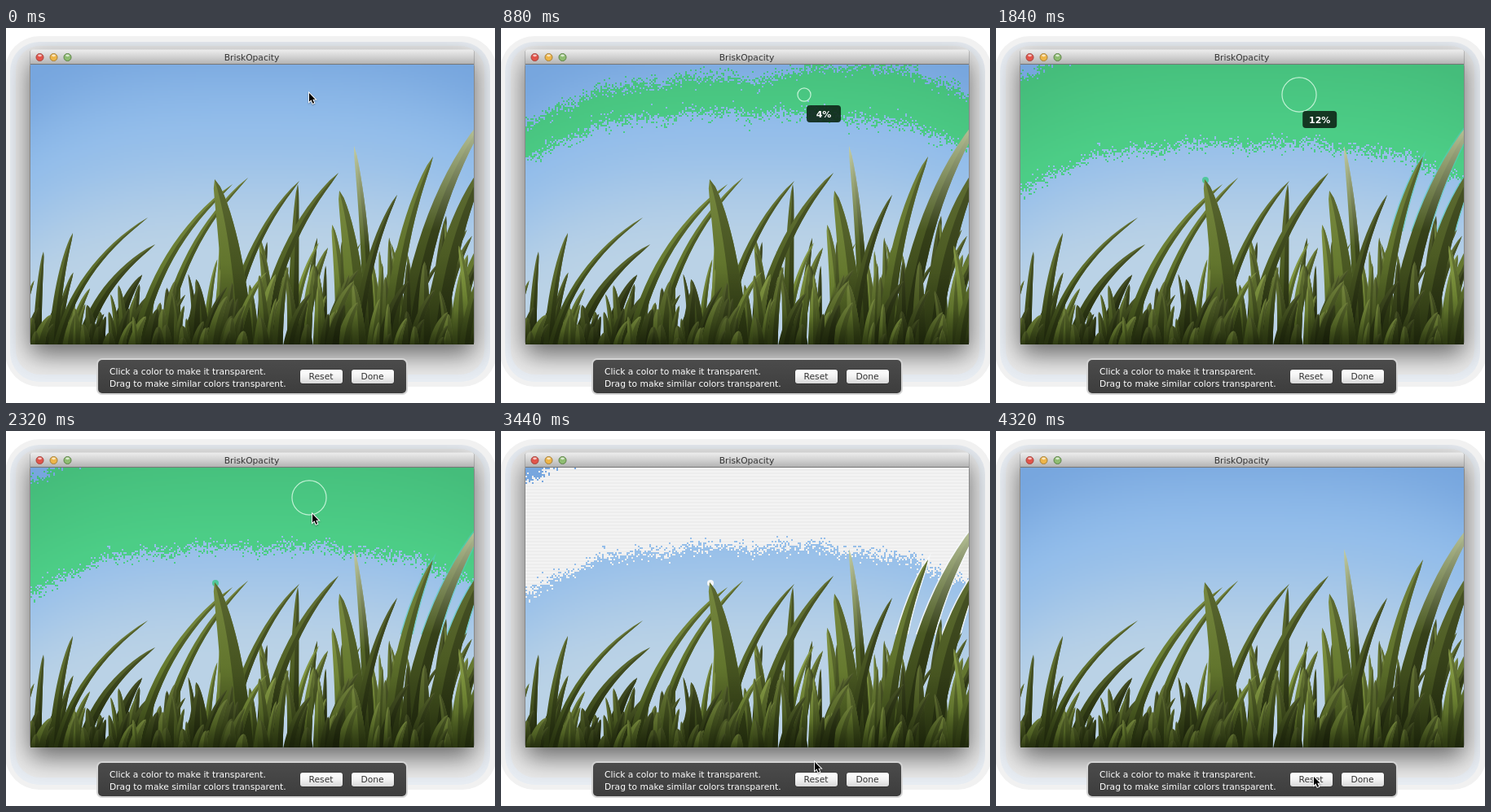
An HTML page with a canvas that plays this animation: 600x461 px, repeating every 4.4 s.

```html
<!DOCTYPE html>
<html lang="en">
<head>
<meta charset="utf-8">
<title>Make a color transparent</title>
<style>
html, body { margin: 0; width: 100%; height: 100%; overflow: hidden; background: #fff; }
canvas { display: block; }
</style>
</head>
<body>
<canvas id="stage" width="600" height="461"></canvas>
<script>
const LOOP = 4400, STEP = 80;
const PRESS = 560, RELEASE = 2320, CLEAR = 2400, RESET = 4080;
const BOX = { x: 30, y: 45, w: 544, h: 344 };
const CELL = 2, COLS = BOX.w / CELL, ROWS = BOX.h / CELL;
const FONT = '"DejaVu Sans", sans-serif';
const ctx = document.getElementById('stage').getContext('2d');

function makeLayer(w, h) {
  const c = document.createElement('canvas');
  c.width = w;
  c.height = h;
  return c.getContext('2d');
}

function seeded(seed) {
  return () => {
    seed = (seed + 0x6D2B79F5) | 0;
    let n = Math.imul(seed ^ (seed >>> 15), 1 | seed);
    n = (n + Math.imul(n ^ (n >>> 7), 61 | n)) ^ n;
    return ((n ^ (n >>> 14)) >>> 0) / 4294967296;
  };
}

const clamp = (v, a, b) => Math.min(b, Math.max(a, v));
const smooth = u => { u = clamp(u, 0, 1); return u * u * (3 - 2 * u); };
const mix = (a, b, u) => a + (b - a) * u;
const mixColor = (a, b, u) => a.map((n, i) => mix(n, b[i], u));

function roundRect(c, x, y, w, h, r, fill) {
  c.beginPath();
  c.roundRect(x, y, w, h, r);
  c.fillStyle = fill;
  c.fill();
}

function vertical(c, y0, y1, ...colors) {
  const g = c.createLinearGradient(0, y0, 0, y1);
  colors.forEach((col, i) => g.addColorStop(i / (colors.length - 1), col));
  return g;
}

function label(c, text, x, y, color, align = 'center', font = '10.7px ') {
  c.font = font + FONT;
  c.textAlign = align;
  c.textBaseline = 'alphabetic';
  c.fillStyle = color;
  c.fillText(text, x, y);
}

// ---- Sky ----
// Lines of equal brightness bow upwards in the middle.
const arc = x => 107 + (x < 300 ? 58 : 43) * Math.abs((x - 300) / 272) ** 3;

function paintCells(color) {
  const layer = makeLayer(COLS, ROWS);
  const img = layer.createImageData(COLS, ROWS);
  for (let i = 0; i < COLS * ROWS; i++) {
    const x = BOX.x + i % COLS * CELL, y = BOX.y + Math.floor(i / COLS) * CELL;
    const rgb = color(x, y, y - arc(x), i);
    if (rgb) img.data.set([...rgb, 255], i * 4);
  }
  layer.putImageData(img, 0, 0);
  return layer.canvas;
}

function skyColor(x, y, d) {
  const top = mixColor([119, 166, 222], [145, 188, 234], smooth((d + 110) / 130));
  return mixColor(top, [186, 210, 230], smooth((d + 15) / 190));
}

const rnd = seeded(7);
const grain = Float32Array.from({ length: COLS * ROWS }, () => (rnd() + rnd() + rnd() - 1.5) * 13);
const masks = {};

// The selected band widens around the clicked color with the tolerance in percent.
function mask(pct, clear) {
  const key = pct + (clear ? 'c' : 'g');
  const lo = -18 - 7 * pct, hi = 0.3 * pct * pct - 8;
  const extra = 24 * Math.min(1, pct / 4);
  return masks[key] ||= paintCells((x, y, d, i) => {
    const v = d + grain[i] + 2.5 * Math.sin(x * 0.052 + 1) + 2 * Math.sin(x * 0.117);
    if (v < lo - extra * smooth((x - 310) / 140) || v > hi) return null;
    if (clear) return Array(3).fill(y / CELL % 2 < 1 ? 243 : 237);
    return mixColor([69, 189, 123], [76, 205, 134], clamp((d + 90) / 110, 0, 1));
  });
}

// ---- Grass ----
// Leading blades: tip x, tip y, root x, width.
const KEYS = [
  [46, 275, 38, 11], [82, 252, 58, 13], [174, 233, 62, 10], [183, 266, 92, 15],
  [278, 192, 160, 14], [297, 184, 190, 12], [360, 188, 270, 13], [358, 192, 352, 15],
  [408, 178, 312, 17], [256, 186, 285, 38], [427, 145, 446, 15], [409, 200, 432, 30],
  [480, 205, 430, 14], [524, 158, 470, 20], [592, 105, 492, 28], [590, 165, 525, 32]
];
const GROUND = 394;

const skyline = x => 272 - 75 * smooth((x - 90) / 210) - 45 * smooth((x - 470) / 110);

function bladeSides([tx, ty, bx, w]) {
  const cx = mix(bx, tx, 0.2), cy = mix(ty, GROUND, 0.38);
  const sides = { left: [], mid: [], right: [] };
  for (let u = 0; u <= 1; u += 1 / 16) {
    const v = 1 - u;
    const x = v * v * bx + 2 * v * u * cx + u * u * tx;
    const y = v * v * GROUND + 2 * v * u * cy + u * u * ty;
    const dx = v * (cx - bx) + u * (tx - cx), dy = v * (cy - GROUND) + u * (ty - cy);
    const s = w / 2 * v ** 0.55 / Math.hypot(dx, dy);
    sides.left.push([x + dy * s, y - dx * s]);
    sides.mid.push([x, y]);
    sides.right.push([x - dy * s, y + dx * s]);
  }
  return sides;
}

function trace(c, a, b) {
  c.beginPath();
  [...a, ...b.slice().reverse()].forEach(([x, y]) => c.lineTo(x, y));
  c.closePath();
}

// The tallest blades are out of focus and pale at the tip.
function blade(c, b, tone) {
  const { left, mid, right } = bladeSides(b);
  const shade = l => vertical(c, b[1], 392,
    b[1] < 150 ? '#c3cda6' : `hsl(74 36% ${l + 7}%)`, `hsl(76 44% ${l}%)`, `hsl(78 50% ${l * 0.55}%)`);
  trace(c, left, right);
  c.fillStyle = shade(tone);
  c.fill();
  trace(c, mid, right);
  c.fillStyle = shade(tone * 0.72);
  c.fill();
}

// Random blades, tall ones at the back and short ones in front.
function field(c, rnd, from, to, count) {
  for (let i = 0; i < count; i++) {
    const x = 10 + rnd() * 570, depth = mix(from, to, i / count);
    const top = mix(skyline(x) + 15, 368, depth) + rnd() * 20;
    const lean = (rnd() - 0.25) * (GROUND - top) * 0.55;
    blade(c, [x + lean, top, x, 8 + rnd() * 11], 17 + rnd() * 22);
  }
}

function paintGrass() {
  const c = makeLayer(600, 461), rnd = seeded(23);
  field(c, rnd, 0.15, 0.7, 75);
  KEYS.forEach(b => blade(c, b, 22 + rnd() * 12));
  field(c, rnd, 0.45, 1, 95);
  c.globalCompositeOperation = 'source-atop';
  c.fillStyle = vertical(c, 300, 392, 'rgba(24,34,8,0)', 'rgba(24,34,8,.15)', 'rgba(22,30,6,.5)');
  c.fillRect(0, 300, 600, 95);
  return c.canvas;
}

// Selection that leaks around the blurred blades.
function fringe(clear) {
  ctx.save();
  ctx.beginPath();
  ctx.rect(BOX.x, BOX.y, BOX.w, 205);
  ctx.clip();
  ctx.lineWidth = 3;
  ctx.strokeStyle = clear ? 'rgba(248,250,252,.9)' : 'rgba(84,205,190,.6)';
  KEYS.slice(-3).forEach(b => {
    const { left, right } = bladeSides(b);
    trace(ctx, left, right);
    ctx.stroke();
  });
  ctx.beginPath();
  ctx.arc(257, 187, 4, 0, 7);
  ctx.fillStyle = clear ? '#f4f6f8' : '#50c79c';
  ctx.fill();
  ctx.restore();
}

// ---- Window and toolbar ----
function button(c, x, text) {
  roundRect(c, x - 0.5, 419.5, 53, 18.5, 4, '#333');
  roundRect(c, x, 420, 52, 17, 3, vertical(c, 420, 437, '#fff', '#f2f2f2', '#d8d8d8'));
  label(c, text, x + 25.5, 432, '#333');
}

function light(c, x, fill, rim) {
  c.beginPath();
  c.arc(x, 36, 4.5, 0, 7);
  c.fillStyle = fill;
  c.fill();
  c.strokeStyle = rim;
  c.stroke();
  c.beginPath();
  c.ellipse(x, 33.8, 2.4, 1.4, 0, 0, 7);
  c.fillStyle = 'rgba(255,255,255,.65)';
  c.fill();
}

function paintShell() {
  const c = makeLayer(600, 461);
  c.fillStyle = '#fff';
  c.fillRect(0, 0, 600, 461);
  roundRect(c, -1, 10, 603, 431, 42, '#f1f1f1');
  roundRect(c, 5, 17, 589, 418, 36, '#e9eef4');
  roundRect(c, 12, 22, 575, 404, 30, '#ebebeb');

  c.save();
  c.beginPath();
  c.roundRect(5, 17, 589, 418, 36);
  c.clip();
  c.shadowColor = 'rgba(0,0,0,.58)';
  c.shadowBlur = 32;
  c.shadowOffsetY = 12;
  roundRect(c, 29, 27, 546, 362, 4, '#888');
  c.restore();

  roundRect(c, 29.5, 26.5, 545, 20, [4, 4, 0, 0],
    vertical(c, 27, 45, '#ececec', '#d0d0d0', '#b0b0b0'));
  c.fillStyle = '#777';
  c.fillRect(30, 44, 544, 1);
  light(c, 41.5, '#e2544a', '#a5453e');
  light(c, 58.5, '#eeb548', '#a5803a');
  light(c, 75.5, '#8fbd72', '#5b8146');
  label(c, 'BriskOpacity', 301.5, 40, '#333');

  roundRect(c, 111, 406, 382, 45, 7, '#d4d4d4');
  roundRect(c, 113, 408, 378, 41, 5, vertical(c, 408, 449, '#4b4b4b', '#3d3d3d'));
  label(c, 'Click a color to make it transparent.', 127, 426, '#fff', 'left');
  label(c, 'Drag to make similar colors transparent.', 127, 441, '#fff', 'left');
  button(c, 361, 'Reset');
  button(c, 424, 'Done');
  return c.canvas;
}

// ---- Pointer, ring and badge ----
const ARROW = new Path2D('M0 0V12.6L2.9 9.9L5.2 15.2L7.4 14.2L5.1 9.1H9Z');

function pointerAt(t) {
  const glide = (from, to) => smooth((t - from) / (to - from));
  if (t < PRESS) return [372, 80 + 2 * glide(0, PRESS)];
  if (t < 2960) return [376 - 4 * glide(RELEASE, 2800), 102 + 9 * glide(RELEASE, 2800)];
  const down = glide(2960, 3440), settle = glide(3440, 3760);
  return [372 + 13 * down + 5 * settle, 111 + 296 * down + 18 * settle];
}

function drawPointer(t) {
  ctx.save();
  ctx.translate(...pointerAt(t));
  ctx.scale(0.84, 0.84);
  ctx.shadowColor = 'rgba(0,0,0,.35)';
  ctx.shadowBlur = 2;
  ctx.shadowOffsetY = 1;
  ctx.strokeStyle = '#fff';
  ctx.lineWidth = 2.2;
  ctx.stroke(ARROW);
  ctx.shadowColor = 'transparent';
  ctx.fillStyle = '#000';
  ctx.fill(ARROW);
  ctx.restore();
}

function drawRing(r) {
  ctx.beginPath();
  ctx.arc(372, 82, r, 0, 7);
  ctx.strokeStyle = 'rgba(215,250,228,.85)';
  ctx.lineWidth = 1.2;
  ctx.stroke();
}

function drawBadge(pct, r) {
  const x = 374.3 + r * 0.09, y = 90.6 + r * 0.545;
  roundRect(ctx, x, y, 42, 21, 4, 'rgba(16,42,27,.92)');
  label(ctx, pct + '%', x + 21, y + 14.6, '#fff', 'center', 'bold 11px ');
}

const shell = paintShell(), sky = paintCells(skyColor), grass = paintGrass();

function draw(t) {
  const pct = t < RESET ? clamp(Math.round((t - PRESS) / STEP), 0, 12) : 0;
  const clear = t >= CLEAR;
  const r = 1.6 + 1.62 * pct;

  ctx.drawImage(shell, 0, 0);
  ctx.save();
  ctx.beginPath();
  ctx.rect(BOX.x, BOX.y, BOX.w, BOX.h);
  ctx.clip();
  ctx.drawImage(sky, BOX.x, BOX.y, BOX.w, BOX.h);
  if (pct) {
    ctx.imageSmoothingEnabled = false;
    ctx.drawImage(mask(pct, clear), BOX.x, BOX.y, BOX.w, BOX.h);
  }
  if (pct > 9) fringe(clear);
  ctx.drawImage(grass, 0, 0);
  ctx.restore();

  if (pct && !clear) drawRing(r);
  if (pct && t < RELEASE) drawBadge(pct, r);
  else drawPointer(t);
}

const start = performance.now();
function tick() {
  const t = (performance.now() - start) % LOOP;
  draw(Math.floor(t / STEP) * STEP);
  requestAnimationFrame(tick);
}
tick();
</script>
</body>
</html>
```
